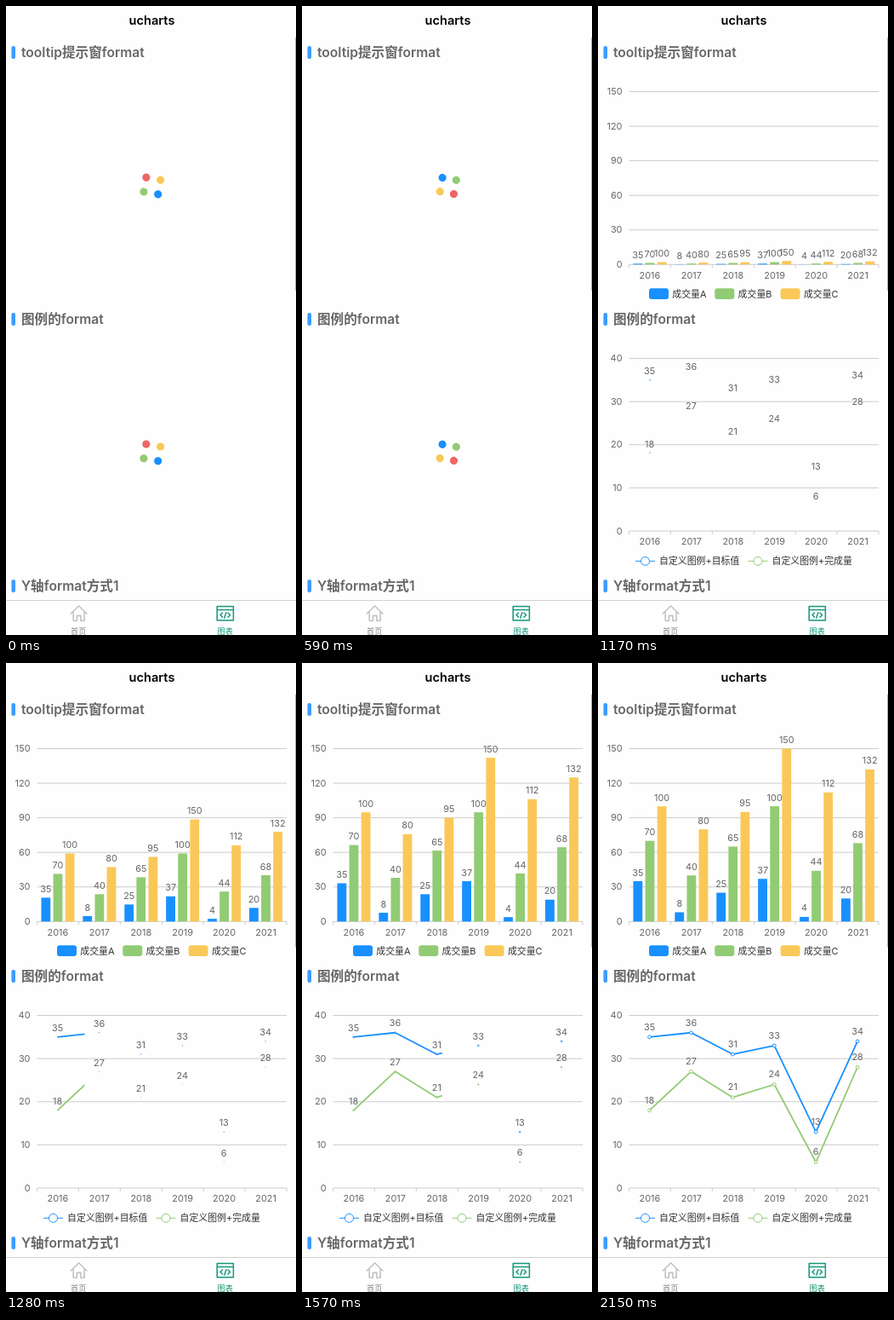
An HTML page that plays this animation: 341x738 px, repeating every 3530 ms.

```html
<!DOCTYPE html>
<html lang="zh-CN">
<head>
<meta charset="utf-8">
<title>ucharts</title>
<style>
  html, body { margin: 0; width: 100%; height: 100%; overflow: hidden; background: #fefefe; }
  svg { display: block; width: 100%; height: 100%; font-family: Inter, "Noto Sans CJK SC", "Noto Sans CJK JP", "Noto Sans CJK", sans-serif; }
  text { font-size: 10.9px; fill: #666; }
  .title { font-size: 14.6px; font-weight: 600; fill: #000; }
  .heading { font-size: 15.6px; font-weight: 600; }
  .legend { fill: #333; }
  .tab { font-size: 9.2px; font-weight: 500; fill: #888; }
  .tab.active { fill: #12967a; }
  .icon { fill: none; stroke: #c3c3c3; stroke-width: 1.6; stroke-linejoin: round; stroke-linecap: round; }
  .icon.active { stroke: #12967a; stroke-width: 1.5; }
</style>
</head>
<body>
<svg id="stage" viewBox="0 0 341 738">
  <defs><clipPath id="reveal"><rect id="revealRect" y="400" height="230"/></clipPath></defs>
  <g id="page"></g>
  <g id="loaders"></g>
  <g id="charts"></g>
  <path d="M340.5 37V333.5" stroke="#b4b4b4"/>
  <path d="M0 697.5H341" stroke="#d2d2d2"/>
  <path class="icon" d="M76.3 713L85.6 703.8L95 713M79.2 711V721.3H83.4V715.4H87.9V721.3H92.1V711"/>
  <path class="icon active" d="M248.2 704.6H267.4V720.8H248.2ZM248.2 708.4H267.4M254.6 712L252 714.5L254.6 717M261 712L263.6 714.5L261 717M258.9 711.6L256.9 718"/>
</svg>
<script>
const LOOP = 3530, STEP = 58.1;
const CHART_START = 1152, CHART_DURATION = 980;
const BLUE = '#1890ff', GREEN = '#91cb74', YELLOW = '#fac858', RED = '#ee6666';
const LEFT = 36.5, RIGHT = 330, SPACING = (RIGHT - LEFT) / 6;
const YEARS = [2016, 2017, 2018, 2019, 2020, 2021];
const $ = id => document.getElementById(id);
const centerX = i => LEFT + SPACING * (i + 0.5);

function set(node, attrs) {
  for (const key in attrs) node.setAttribute(key, attrs[key]);
  return node;
}

function add(parent, tag, attrs) {
  return parent.appendChild(set(document.createElementNS('http://www.w3.org/2000/svg', tag), attrs));
}

function label(parent, content, x, y, anchor = 'middle', cls = '') {
  const node = add(parent, 'text', { x, y, 'text-anchor': anchor, class: cls });
  node.textContent = content;
  return node;
}

// Page chrome
const page = $('page'), charts = $('charts');
label(page, 'ucharts', 171.5, 22, 'middle', 'title');
['tooltip提示窗format', '图例的format', 'Y轴format方式1'].forEach((name, i) => {
  const y = 54.5 + 313 * i;
  add(page, 'rect', { x: 6.4, y: y - 7.5, width: 4.6, height: 15, rx: 2, fill: '#3c9cff' });
  label(page, name, 18, y + 5.7, 'start', 'heading');
});
label(page, '首页', 85.3, 737.2, 'middle', 'tab');
label(page, '图表', 257.8, 737.2, 'middle', 'tab active');

// Loading spinners
const loaders = [211, 523.9].map(y => {
  const group = add($('loaders'), 'g', { transform: `translate(171.8 ${y}) rotate(10)` });
  return [[BLUE, -1, -1], [GREEN, 1, -1], [YELLOW, -1, 1], [RED, 1, 1]].map(([fill, dx, dy]) =>
    ({ dx, dy, node: add(group, 'circle', { r: 4.6, fill }) }));
}).flat();

function drawAxes(top, bottom, max, divisions) {
  for (let i = 0; i <= divisions; i++) {
    const y = bottom - (bottom - top) * i / divisions;
    add(charts, 'path', { d: `M${LEFT} ${y}H${RIGHT}`, stroke: '#ccc' });
    label(charts, max * i / divisions, 28.5, y + 3.7, 'end');
  }
  for (let i = 0; i <= 6; i++)
    add(charts, 'path', { d: `M${LEFT + SPACING * i} ${bottom}v4`, stroke: '#ccc' });
  YEARS.forEach((year, i) => label(charts, year, centerX(i), bottom + 16.3));
}

// Column chart
const BASE = 303.3, COLUMN_SCALE = (BASE - 100.5) / 150;
drawAxes(100.5, BASE, 150, 5);
const columns = [
  ['成交量A', BLUE, [35, 8, 25, 37, 4, 20]],
  ['成交量B', GREEN, [70, 40, 65, 100, 44, 68]],
  ['成交量C', YELLOW, [100, 80, 95, 150, 112, 132]]
].flatMap(([name, fill, values], s) => {
  const x = 60 + 77.3 * s;
  add(charts, 'rect', { x, y: 331.3, width: 23, height: 12.7, rx: 3, fill });
  label(charts, name, x + 27.3, 342, 'start', 'legend');
  return values.map((value, i) => {
    const cx = centerX(i) + 14.1 * (s - 1);
    return { value, cx, bar: add(charts, 'rect', { x: cx - 5.4, width: 10.8, fill }) };
  });
});
columns.forEach(c => c.text = label(charts, c.value, c.cx, 0));

// Line chart
const LINE_BASE = 616, LINE_SCALE = (LINE_BASE - 413.5) / 40;
drawAxes(413.5, LINE_BASE, 40, 4);
const points = [
  ['自定义图例+目标值', BLUE, [35, 36, 31, 33, 13, 34]],
  ['自定义图例+完成量', GREEN, [18, 27, 21, 24, 6, 28]]
].flatMap(([name, stroke, values], s) => {
  const x = 44 + 132.5 * s;
  add(charts, 'path', { d: `M${x} 651.3h23`, stroke });
  add(charts, 'circle', { cx: x + 11.5, cy: 651.3, r: 5, fill: '#fff', stroke });
  label(charts, name, x + 28, 655.3, 'start', 'legend');
  const spots = values.map((value, i) => ({ value, x: centerX(i) - 0.4, y: LINE_BASE - value * LINE_SCALE }));
  add(charts, 'polyline', {
    points: spots.map(p => `${p.x},${p.y}`).join(' '),
    fill: 'none', stroke, 'stroke-width': 1.8, 'stroke-linejoin': 'round', 'clip-path': 'url(#reveal)'
  });
  spots.forEach(p => p.dot = add(charts, 'circle', { cx: p.x, cy: p.y, fill: '#fff', stroke }));
  return spots;
});
points.forEach(p => p.text = label(charts, p.value, p.x, 0));

// cubic-bezier(.25, .1, .25, 1)
function ease(x) {
  let low = 0, high = 1;
  for (let i = 0; i < 24; i++) {
    const s = (low + high) / 2;
    if (0.75 * s - 0.75 * s * s + s ** 3 < x) low = s; else high = s;
  }
  return 0.3 * (1 - low) ** 2 * low + 3 * (1 - low) * low ** 2 + low ** 3;
}

const easeOutExpo = p => p >= 1 ? 1 : 1 - 2 ** (-10 * p);

function drawLoaders(time) {
  const phase = (0.775 + time / 500) % 2;
  const offset = 9.09 * (1 - 2 * ease(phase > 1 ? 2 - phase : phase));
  for (const { node, dx, dy } of loaders) set(node, { cx: dx * offset, cy: dy * offset });
}

function drawCharts(progress) {
  // The first tick lands almost at zero.
  const p = progress < 0.02 ? 0.003 : Math.min(progress, 1);
  const grow = easeOutExpo(p);
  for (const { value, bar, text } of columns) {
    const height = value * COLUMN_SCALE * grow;
    set(bar, { y: BASE - height, height });
    set(text, { y: BASE - height - 6.4 });
  }
  const edge = p < 1 ? centerX(0) + 5 * SPACING * p : RIGHT;
  set($('revealRect'), { x: LEFT, width: edge - LEFT });
  for (const { y, dot, text } of points) {
    set(dot, { r: 1.9 * p });
    set(text, { y: y - 6.6 - 1.6 * p });
  }
}

function render(now) {
  const time = Math.floor((now % LOOP) / STEP) * STEP;
  const progress = (time - CHART_START) / CHART_DURATION;
  const loaded = progress >= 0;
  $('loaders').style.display = loaded ? 'none' : '';
  charts.style.display = loaded ? '' : 'none';
  if (loaded) drawCharts(progress); else drawLoaders(time);
}

const start = performance.now();
function tick() {
  render(performance.now() - start);
  requestAnimationFrame(tick);
}
tick();
</script>
</body>
</html>
```
